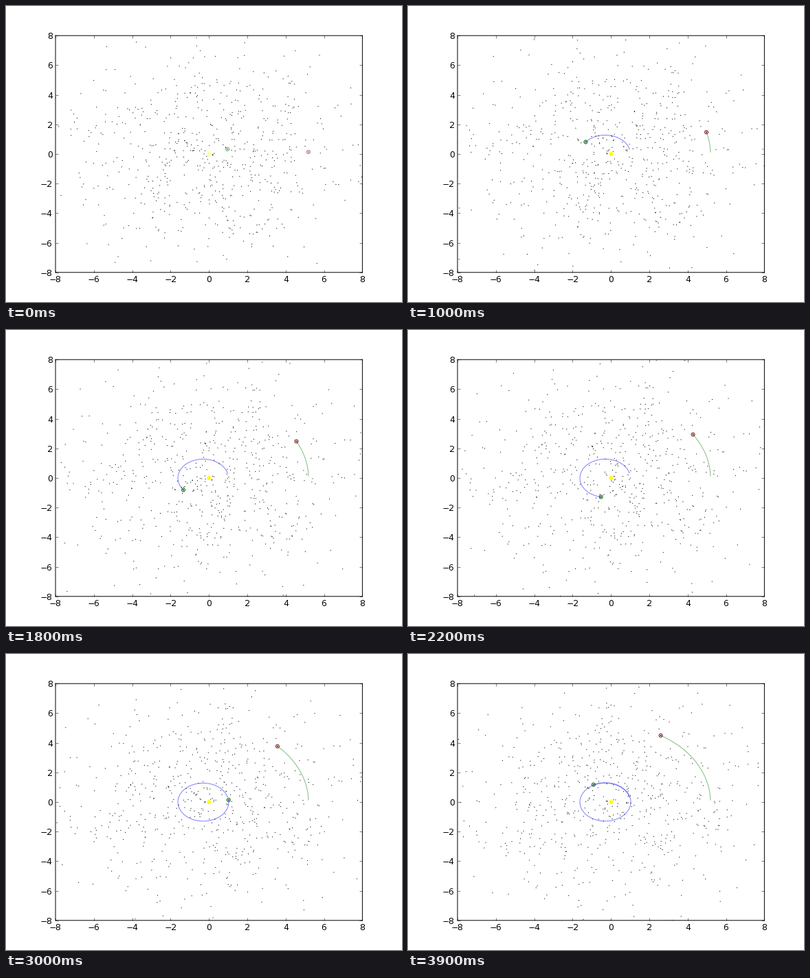
A matplotlib script that plays this animation: 576 px wide and 432 px high, repeating every 4000 ms.

```python
import matplotlib.pyplot as plt
import numpy as np
from matplotlib.animation import FuncAnimation

FRAMES = 40
STEP = np.radians(17.74)  # angle per frame at radius 1
ECC = 0.227

plt.rcParams.update({
    "font.family": "DejaVu Sans",
    "font.size": 12,
    "text.hinting_factor": 1,
    "axes.linewidth": 1.0,
    "axes.unicode_minus": True,
})


def inner_orbit(t):
    """Eccentric orbit that slowly widens."""
    t = np.asarray(t, dtype=float)
    mean = np.radians(11.6 + 12.25 * t - 0.016 * t ** 2)
    anomaly = mean
    for _ in range(12):
        anomaly = mean + ECC * np.sin(anomaly)
    a = 1.305 * (1 + 0.0008 * t)
    b = a * np.sqrt(1 - ECC ** 2)
    return a * (np.cos(anomaly) - ECC), b * np.sin(anomaly)


def outer_orbit(t):
    angle = np.radians(1.5 + 1.5 * np.asarray(t, dtype=float))
    return 5.19 * np.cos(angle), 5.19 * np.sin(angle)


rng = np.random.default_rng(5)
COUNT = 660
radius = np.maximum(5.1 * rng.weibull(2.1, COUNT), 0.2)
phase = rng.uniform(0, 2 * np.pi, COUNT)
speed = STEP / radius ** 1.5


def asteroids(t):
    angle = phase + speed * t
    return np.column_stack([radius * np.cos(angle), radius * np.sin(angle)])


fig = plt.figure(figsize=(8, 6), dpi=72, facecolor="white")
ax = fig.add_axes([0.125, 0.1, 0.775, 0.8])
ax.set(xlim=(-8, 8), ylim=(-8, 8),
       xticks=range(-8, 9, 2), yticks=range(-8, 9, 2))
ax.tick_params(direction="in", length=4, width=0.5, pad=4,
               top=True, right=True)
for spine in ax.spines.values():
    spine.set_snap(False)


def circles(count, size, **style):
    """Circles placed at subpixel positions; size is the area in points."""
    start = np.zeros(count)
    return ax.scatter(start, start, s=np.full(count, size), **style)


dust = circles(COUNT, 1.4, color="black", linewidths=0, zorder=2)
orbits = [inner_orbit, outer_orbit]
trails = [ax.plot([], [], color=c, alpha=0.5, lw=1, zorder=3)[0]
          for c in ("blue", "green")]

# sun, inner planet, outer planet
sun_fill = circles(1, 22, color="yellow", linewidths=0, zorder=4)
rings = circles(3, 25, facecolors="none", linewidths=1, zorder=5,
                edgecolors=["yellow", "#006400", "#801010"])
centres = circles(3, 4.5, linewidths=0, zorder=6,
                  facecolors=["yellow", "#0a3a40", "#4a1a10"])


def draw(i):
    dust.set_offsets(asteroids(i))
    times = np.linspace(0, i, 10 * i + 1)
    places = [(0, 0)]
    for orbit, trail in zip(orbits, trails):
        x, y = orbit(times)
        trail.set_data(x, y)
        places.append((x[-1], y[-1]))
    for part in (rings, centres):
        part.set_offsets(places)
        part.set_alpha(0.6 if i == 0 else 1)
    # the sun's disc fills in over the first frames
    sun_fill.set_alpha(min(1, i / 8))
    return []


anim = FuncAnimation(fig, draw, frames=FRAMES, interval=100,
                     repeat=True, repeat_delay=0, blit=False)
plt.show()
```
